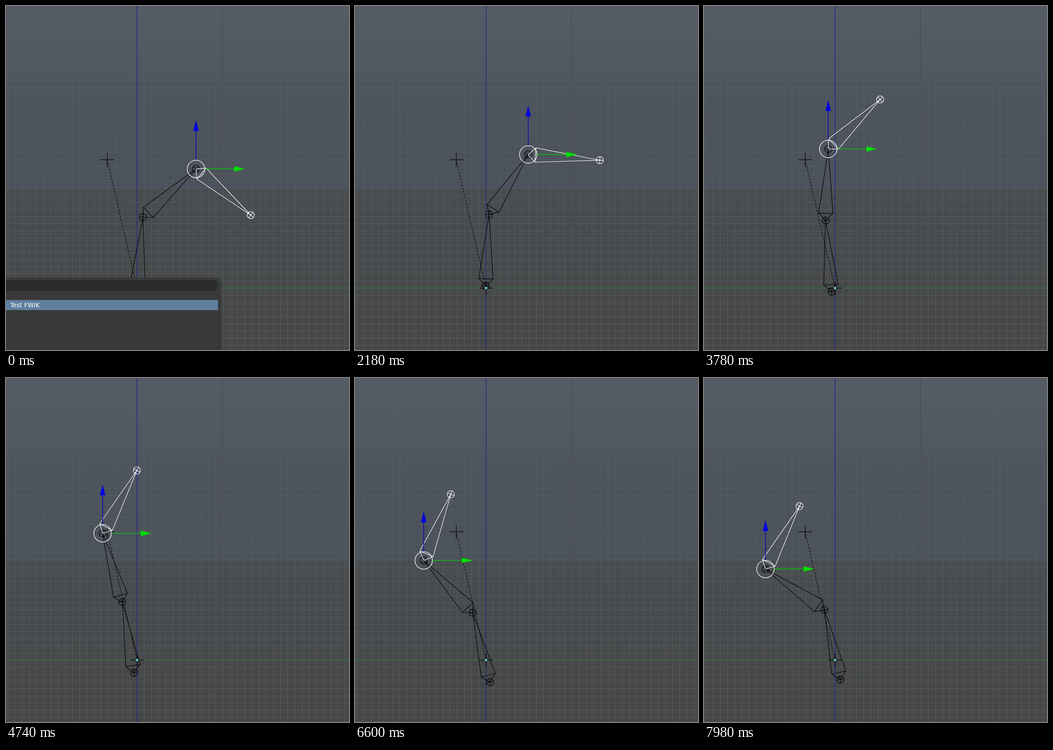
An HTML page with a canvas for the animation above (8 s loop, 746x750 px).

```html
<!DOCTYPE html>
<html lang="en">
<head>
<meta charset="utf-8">
<title>Bone chain</title>
<style>
  html, body { margin: 0; height: 100%; overflow: hidden; background: #4a4d50; }
  canvas { display: block; width: 100vw; height: 100vh; }
</style>
</head>
<body>
<canvas id="view" width="746" height="750"></canvas>
<script>
const ctx = document.getElementById('view').getContext('2d');
const W = 746, H = 750, LOOP = 8000;
const UNIT = 156, ORIGIN = [285, 615], EMPTY = [220, 335];

// First and last change of each run of eight steps, in ms.
const RUNS = [[320, 1110], [1210, 1960], [2080, 2820], [2920, 3680], [3780, 4520],
              [4640, 5400], [5500, 6250], [6390, 7130], [7230, 7980]];

// step, root x, root y, then the direction of each bone in degrees
const POSES = [
  [0, 285.5, 616, -85.4, -42.4, 40.2],
  [7, 285.2, 615, -85.4, -44.1, 33.2],
  [16, 284.4, 611.4, -86.8, -53.5, 10.2],
  [18, 284, 610.2, -87.2, -56.9, 4.6],
  [24, 281.3, 610.3, -89.8, -66.8, -12.9],
  [33, 277.3, 623, -94.8, -87.8, -43.7],
  [42, 278.6, 642.5, -99.4, -106, -61.5],
  [48, 283, 655.5, -102, -117.4, -66.9],
  [59, 293.5, 663.2, -103.9, -133.1, -67.8],
  [64, 296, 662.4, -103.6, -138.4, -66],
  [72, 296.5, 657.5, -102.8, -145.3, -61.6]
];

function stepAt(ms) {
  let step = 0;
  RUNS.forEach(([first, last], run) => {
    if (ms >= first) {
      step = run * 8 + 1 + Math.min(7, Math.floor((ms - first) * 7 / (last - first) + 0.15));
    }
  });
  return step;
}

function secant(i, col) {
  const a = POSES[i], b = POSES[i + 1];
  return (b[col] - a[col]) / (b[0] - a[0]);
}

function slope(i, col) {
  if (i === 0) return secant(0, col);
  if (i === POSES.length - 1) return secant(i - 1, col);
  const before = POSES[i][0] - POSES[i - 1][0], after = POSES[i + 1][0] - POSES[i][0];
  return (secant(i - 1, col) * after + secant(i, col) * before) / (before + after);
}

// Cubic Hermite curve through the poses.
function poseAt(step) {
  let i = 0;
  while (i < POSES.length - 2 && step >= POSES[i + 1][0]) i++;
  const a = POSES[i], b = POSES[i + 1], span = b[0] - a[0], u = (step - a[0]) / span;
  return [1, 2, 3, 4, 5].map(col => {
    const ease = u * u * (3 - 2 * u);
    return a[col] + (b[col] - a[col]) * ease
      + span * u * (1 - u) * ((1 - u) * slope(i, col) - u * slope(i + 1, col));
  });
}

function path(points, color, width = 1.15) {
  ctx.beginPath();
  points.forEach(p => ctx.lineTo(p[0], p[1]));
  ctx.strokeStyle = color;
  ctx.lineWidth = width;
  ctx.stroke();
}

function circle([x, y], r, color, width = 1.2) {
  ctx.beginPath();
  ctx.arc(x, y, r, 0, 7);
  ctx.strokeStyle = color;
  ctx.lineWidth = width;
  ctx.stroke();
}

function rect(x, y, w, h, color) {
  ctx.fillStyle = color;
  ctx.fillRect(x, y, w, h);
}

function roundRect(x, y, w, h, r, color) {
  ctx.beginPath();
  ctx.roundRect(x, y, w, h, r);
  ctx.fillStyle = color;
  ctx.fill();
}

// Point at distances along and across a direction.
function offset([x, y], angle, along, across = 0) {
  const c = Math.cos(angle), s = Math.sin(angle);
  return [x + c * along - s * across, y + s * along + c * across];
}

function joint(p, angle, color) {
  circle(p, 7.8, color);
  path([offset(p, angle, -8), offset(p, angle, 8)], color);
  path([offset(p, angle, 0, -8), offset(p, angle, 0, 8)], color);
}

function bone(head, tail, angle, color) {
  const left = offset(head, angle, UNIT / 10, -UNIT / 10);
  const right = offset(head, angle, UNIT / 10, UNIT / 10);
  path([head, left, tail, right, head], color);
  path([left, right], color);
  joint(tail, angle, color);
}

function plus([x, y]) {
  rect(x - 15, y - 0.5, 31, 1.2, '#000');
  rect(x - 0.3, y - 15, 1.2, 31, '#000');
}

function arrow(p, angle, color, shaft) {
  path([offset(p, angle, 20), offset(p, angle, 84)], shaft, 1.4);
  ctx.beginPath();
  [[106.5, 0], [83, -6], [83, 6]].forEach(([u, v]) => ctx.lineTo(...offset(p, angle, u, v)));
  ctx.fillStyle = color;
  ctx.fill();
}

function background() {
  const sky = ctx.createLinearGradient(0, 0, 0, H);
  [[0, '#545c66'], [163, '#505760'], [164, '#4e555e'], [200, '#4d545d'],
   [397, '#4b525b'], [400, '#494d50'], [H, '#454647']]
    .forEach(([y, color]) => sky.addColorStop(y / H, color));
  rect(0, 0, W, H, sky);

  const cell = UNIT / 10;
  for (let x = ORIGIN[0] % cell; x < W; x += cell) {
    const px = Math.floor(x);
    rect(px, 0, 1, 163, 'rgba(90,97,100,.18)');
    rect(px, 163, 1, 235, 'rgba(92,99,106,.55)');
    rect(px, 398, 1, H - 398, '#585b5c');
  }
  for (let y = ORIGIN[1] - 29 * cell; y < H; y += cell) {
    rect(0, Math.floor(y), W, 1, y < 398 ? 'rgba(92,99,106,.55)' : '#585b5c');
  }
  ctx.strokeStyle = 'rgba(86,88,84,.8)';
  ctx.lineWidth = 1;
  ctx.strokeRect(0.5, 0.5, W - 1, H - 1);

  rect(470, 0, 1, 615, '#43484a');
  rect(0, 614, W, 1.2, '#267a2a');
  rect(284.4, 0, 1.2, H, '#1c1c8e');
}

function menu() {
  ctx.save();
  ctx.shadowColor = 'rgba(0,0,0,.6)';
  ctx.shadowBlur = 10;
  ctx.shadowOffsetY = 4;
  roundRect(-20, 593, 484, 180, 6, '#393939');
  ctx.restore();
  roundRect(-20, 598, 479, 23, 5, '#2b2b2b');
  rect(0, 641, 461, 22, '#5f7f9f');
  ctx.fillStyle = '#fff';
  ctx.font = '13.4px "DejaVu Sans", sans-serif';
  ctx.fillText('Test FWIK', 9, 657);
}

function draw(ms) {
  const step = stepAt(ms);
  const [x, y, ...degrees] = poseAt(step);
  const angles = degrees.map(d => d * Math.PI / 180);
  const joints = [[x, y]];
  angles.forEach((a, i) => joints.push(offset(joints[i], a, UNIT)));
  const [root, knee, hinge, tip] = joints;

  background();
  ctx.setLineDash([4, 3]);
  path([EMPTY, ORIGIN], '#000');
  ctx.setLineDash([]);
  plus(EMPTY);
  plus(ORIGIN);

  joint(root, angles[0], '#000');
  bone(root, knee, angles[0], '#000');
  bone(knee, hinge, angles[1], '#000');

  ctx.beginPath();
  ctx.arc(...ORIGIN, 3.7, 0, 7);
  ctx.fillStyle = '#62b4b4';
  ctx.fill();
  circle(ORIGIN, 3.8, '#000', 1);

  bone(hinge, tip, angles[2], '#fff');
  circle(hinge, 19, '#fff', 1.3);
  arrow(hinge, -Math.PI / 2, '#0000e0', '#0000c4');
  arrow(hinge, 0, '#00dc00', '#00d000');

  if (step === 0) menu();
}

function tick() {
  draw(performance.now() % LOOP);
  requestAnimationFrame(tick);
}
tick();
</script>
</body>
</html>
```
